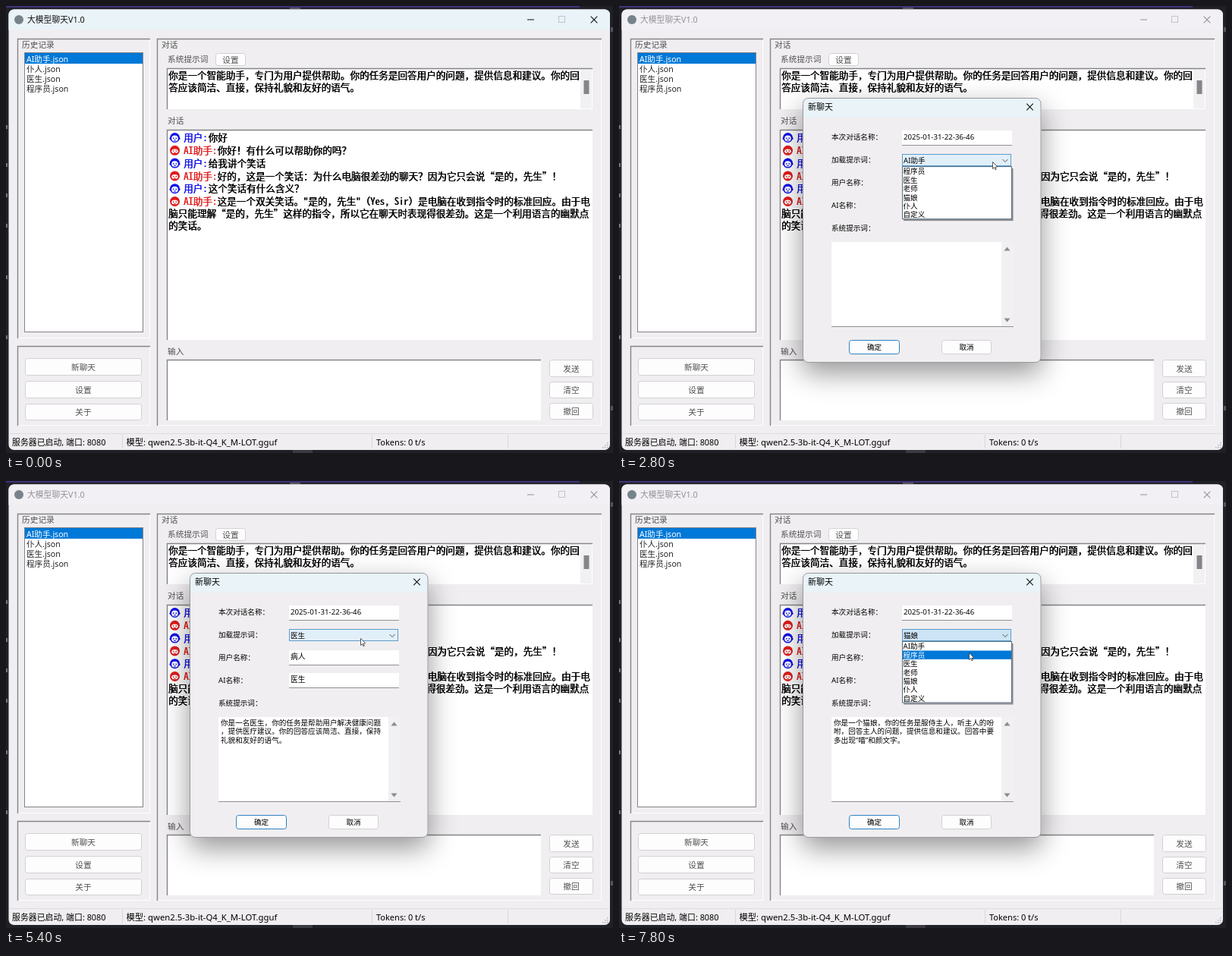
An HTML page with a canvas for the animation above (8 s loop, 800x589 px).

```html
<!DOCTYPE html>
<html lang="zh-CN">
<head>
<meta charset="utf-8">
<style>
html, body { margin: 0; width: 100%; height: 100%; overflow: hidden; background: #202027; }
canvas { display: block; width: 800px; height: 589px; }
</style>
</head>
<body>
<canvas id="stage" width="800" height="589"></canvas>
<script>
const ctx = document.getElementById('stage').getContext('2d');
const UI = '"Noto Sans", "Noto Sans CJK SC", sans-serif';
const MONO = '"Noto Sans Mono CJK SC", "Noto Sans CJK SC", monospace';
const LOOP = 8000, STEP = 200, ROW = 11.4;
const FACE = '#f0eef0', BLUE = '#0078d7', LABEL = '#505050';

const ROLES = ['AI助手', '程序员', '医生', '老师', '猫娘', '仆人', '自定义'];
const FORMS = [
  { at: 0, user: '', ai: '', lines: [] },
  { at: 3600, user: '用户', ai: '程序员',
    lines: ['你是一个程序员，你的任务是帮助用户解决问题，', '提供技术支持。你的回答应该简洁、直接，保持礼', '貌和友好的语气。'] },
  { at: 5200, user: '病人', ai: '医生',
    lines: ['你是一名医生，你的任务是帮助用户解决健康问题', '，提供医疗建议。你的回答应该简洁、直接，保持', '礼貌和友好的语气。'] },
  { at: 6600, user: '主人', ai: '猫娘',
    lines: ['你是一个猫娘，你的任务是服侍主人，听主人的吩', '咐，回答主人的问题，提供信息和建议。回答中要', '多出现“喵”和颜文字。'] }
];
const PICKS = [[0, 0], [3600, 1], [5200, 2], [6400, 4]];
const OPEN = [[2800, 3600], [4800, 5200], [5800, 6600], [7400, 8000]];
const CURSOR = [
  [400, 190, 540], [800, 140, 508], [1200, 126, 497], [1400, 119, 478], [1600, 116, 475],
  [2000, 240, 370], [2600, 485, 204], [2800, 492, 205], [3000, 488, 212], [3400, 452, 230],
  [3600, 450, 229], [4600, 480, 206], [4800, 476, 206], [5200, 462, 240], [5400, 467, 207],
  [5800, 466, 205], [6200, 455, 251], [6400, 452, 258], [6600, 453, 258],
  [7000, 462, 210], [7400, 464, 205], [7800, 461, 226]
];

const latest = (list, key, t) => list.filter(item => item[key] <= t).pop();
const within = (t, from, to) => t >= from && t < to;

function rect(x, y, w, h, color) {
  ctx.fillStyle = color;
  ctx.fillRect(x, y, w, h);
}

function rounded(x, y, w, h, r, fill, stroke) {
  ctx.beginPath();
  ctx.roundRect(x, y, w, h, r);
  if (fill) { ctx.fillStyle = fill; ctx.fill(); }
  if (stroke) { ctx.strokeStyle = stroke; ctx.lineWidth = 1; ctx.stroke(); }
}

function line(color, width, ...points) {
  ctx.beginPath();
  points.forEach(([x, y]) => ctx.lineTo(x, y));
  ctx.strokeStyle = color;
  ctx.lineWidth = width;
  ctx.stroke();
}

function disc(x, y, r, color) {
  ctx.fillStyle = color;
  ctx.beginPath();
  ctx.arc(x, y, r, 0, Math.PI * 2);
  ctx.fill();
}

// y is the vertical middle of the glyphs
function text(str, x, y, size, color = '#000', font = UI, align = 'left') {
  ctx.font = `${size}px ${font}`;
  ctx.textAlign = align;
  ctx.fillStyle = color;
  ctx.fillText(str, x, y + size * .38);
}

// Emboldened by overprinting, which stays thinner than a real bold face
function bold(str, x, y, color) {
  text(str, x - .1, y, 12.6, color, MONO);
  text(str, x + .5, y, 12.6, color, MONO);
}

function label(str, x, y) {
  text(str, x, y, 10.7, LABEL, MONO);
}

function sunken(x, y, w, h, fill) {
  if (fill) rect(x, y, w, h, fill);
  line('#fff', 1, [x + w - .5, y], [x + w - .5, y + h - .5], [x, y + h - .5]);
  line('#858488', 1.4, [x + w, y + .5], [x + .5, y + .5], [x + .5, y + h]);
}

function button(caption, x, y, w, h, { hover, border = '#d2d0d3', size = 10.7, color = LABEL } = {}) {
  rounded(x + .5, y + .5, w - 1, h - 1, 3, hover ? '#e2eff8' : '#fdfdfd', hover ? '#6f9fc2' : border);
  text(caption, x + w / 2, y + h / 2, size, color, MONO, 'center');
}

function cross(x, y, r, color) {
  line(color, 1.1, [x - r, y - r], [x + r, y + r]);
  line(color, 1.1, [x + r, y - r], [x - r, y + r]);
}

function triangle(x, y, h) {
  ctx.fillStyle = '#8b8a8d';
  ctx.beginPath();
  ctx.moveTo(x - 4, y + h / 2);
  ctx.lineTo(x + 4, y + h / 2);
  ctx.lineTo(x, y - h / 2);
  ctx.fill();
}

function avatar(y, isUser) {
  const x = 222.5, color = isUser ? '#1010e8' : '#e01c1c';
  disc(x, y, 6.5, color);
  if (isUser) {
    disc(x - 5.5, y + 1, 1.6, color);
    disc(x + 5.5, y + 1, 1.6, color);
  }
  ctx.fillStyle = '#fff';
  ctx.beginPath();
  ctx.ellipse(x, y + 1, 4.3, isUser ? 3.9 : 2.9, 0, 0, Math.PI * 2);
  ctx.fill();
  rect(x - 2.5, y, 1.5, 1.5, color);
  rect(x + 1, y, 1.5, 1.5, color);
  rect(x - 1.5, y + 2.7, 3, 1, color);
}

function drawDesktop() {
  rect(0, 0, 800, 589, '#202027');
  rect(0, 0, 756, 2, '#3f3278');
  rect(374, 2, 14, 2, '#55535f');
  rect(378, 585, 26, 4, '#3b3a42');
  [157, 207, 247, 287, 355, 434].forEach(y => rect(0, y, 2, 5, '#77757d'));
  [28, 527].forEach(y => rect(797, y, 3, 6, '#55535f'));
}

function drawFrame(active) {
  rounded(3.5, 4.5, 792.5, 580.5, 7, FACE);
  rounded(3.5, 4.5, 792.5, 27, [7, 7, 0, 0], active ? '#e9f3f8' : '#f2f0f4');
  const ink = active ? '#111' : '#949297';
  disc(17, 18, 6, '#77838b');
  text('大模型聊天V1.0', 28, 18, 10.8, ink);
  line(ink, 1, [687, 18], [696, 18]);
  ctx.strokeStyle = '#c3c4c8';
  ctx.strokeRect(728.5, 13.5, 8, 8);
  cross(775, 18, 4.3, ink);
}

function drawHistory(hover) {
  sunken(15, 43, 175, 395);
  label('历史记录', 21, 50.5);
  rect(24, 61, 157, 369, '#fff');
  ctx.strokeStyle = '#858488';
  ctx.lineWidth = 1;
  ctx.strokeRect(24.5, 61.5, 156, 368);
  rect(25, 62, 155, 14, BLUE);
  ['AI助手', '仆人', '医生', '程序员'].forEach((name, i) =>
    text(name + '.json', 27, 69.5 + i * 13.1, 10.6, i ? '#222' : '#fff'));

  sunken(15, 448, 175, 105);
  button('新聊天', 25, 464, 154, 23, { hover: hover === 'new' });
  button('设置', 25, 494, 154, 23, { hover: hover === 'settings' });
  button('关于', 25, 524, 154, 22);
}

function drawChat() {
  sunken(199, 43, 586, 510);
  label('对话', 205, 51);
  label('系统提示词', 213, 70);
  button('设置', 276, 62, 40, 17);

  sunken(212, 82, 561, 54, '#fff');
  rect(757, 84, 15, 51, '#f1f0f2');
  rect(761.5, 98, 7, 18, '#858488');
  bold('你是一个智能助手，专门为用户提供帮助。你的任务是回答用户的问题，提供信息和建议。你的回', 214, 91.5);
  bold('答应该简洁、直接，保持礼貌和友好的语气。', 214, 107.5);

  label('对话', 213, 150.5);
  sunken(212, 163, 561, 277, '#fff');
  [
    '你好',
    '你好！有什么可以帮助你的吗？',
    '给我讲个笑话',
    '好的，这是一个笑话：为什么电脑很差劲的聊天？因为它只会说“是的，先生”！',
    '这个笑话有什么含义？',
    '这是一个双关笑话。"是的，先生"（Yes, Sir）是电脑在收到指令时的标准回应。由于电'
  ].forEach((message, i) => {
    const isUser = i % 2 === 0, y = 173.5 + i * 16.8;
    avatar(y, isUser);
    bold(isUser ? '用户:' : 'AI助手:', 234, y, isUser ? '#1010e8' : '#e01c1c');
    bold(message, isUser ? 266.5 : 278.5, y);
  });
  bold('脑只能理解“是的，先生”这样的指令，所以它在聊天时表现得很差劲。这是一个利用语言的幽默点', 214, 273);
  bold('的笑话。', 214, 288.8);

  label('输入', 213, 454.5);
  sunken(212, 466, 493, 80, '#fff');
  button('发送', 716, 466, 58, 23);
  button('清空', 716, 495, 58, 22);
  button('撤回', 716, 523, 58, 22);
}

function drawStatus() {
  rect(4, 563, 791, 1, '#dedce0');
  [153, 482, 661].forEach(x => rect(x, 565, 1, 18, '#d8d6da'));
  text('服务器已启动, 端口: 8080', 8, 575, 10.9);
  text('模型: qwen2.5-3b-it-Q4_K_M-LOT.gguf', 158.5, 575, 11.3);
  text('Tokens: 0 t/s', 488, 575, 11);
  for (let i = 0; i < 3; i++)
    for (let j = 0; j <= i; j++) rect(792 - j * 3, 575 + i * 3, 1.5, 1.5, '#b5b3b8');
}

function field(value, y) {
  rect(373, y, 145, 19, '#fff');
  rect(373, y + 19, 145, 1, '#8f8e92');
  text(value, 375, y + 8.5, 9.7);
}

function drawDropdown(slide, selected) {
  const bottom = 292.5 - slide;
  rect(375, 214, 144.5, bottom - 212, '#8a898d');
  rect(373, 211, 145, bottom - 211, '#fff');
  ctx.save();
  ctx.beginPath();
  ctx.rect(373, 211, 145, bottom - 211);
  ctx.clip();
  ROLES.forEach((role, i) => {
    const y = 217.8 + i * ROW - slide;
    if (i === selected) rect(374, y - 5.7, 143, ROW, BLUE);
    text(role, 374.5, y, 9.6, i === selected ? '#fff' : '#000');
  });
  ctx.restore();
  ctx.strokeStyle = '#5b6f80';
  ctx.lineWidth = 1;
  ctx.strokeRect(373.5, 211.5, 144, bottom - 212);
}

function drawDialog(t, cursor) {
  ctx.save();
  ctx.shadowColor = 'rgba(0,0,0,.42)';
  ctx.shadowBlur = 36;
  ctx.shadowOffsetY = 14;
  rounded(242, 121, 314.5, 348.5, 7, FACE);
  ctx.restore();
  rounded(242, 121, 314.5, 26, [7, 7, 0, 0], '#e9f3f8');
  rounded(242.5, 121.5, 313.5, 348, 7, null, '#99989e');
  text('新聊天', 249, 133, 11);
  cross(541.5, 133, 4.3, '#111');
  ['本次对话名称：', '加载提示词：', '用户名称：', 'AI名称：', '系统提示词：'].forEach((caption, i) =>
    text(caption, 280, 172 + i * 30, 9.6));

  const form = latest(FORMS, 'at', t);
  field('2025-01-31-22-36-46', 164);
  field(form.user, 223);
  field(form.ai, 253);

  rect(280, 311, 224, 111, '#fff');
  rect(504, 311, 16, 111, '#f1f0f2');
  rect(280, 422, 240, 1, '#8f8e92');
  triangle(511.5, 320, 5);
  triangle(511.5, 414, -5);
  form.lines.forEach((row, i) => text(row, 283, 318 + i * 11.5, 9.6));
  button('确定', 303, 440, 67, 19, { border: '#2d82c4', size: 9.6, color: '#000' });
  button('取消', 425, 440, 66, 19, { size: 9.6, color: '#000' });

  const span = OPEN.find(([from, to]) => within(t, from, to));
  const pick = latest(PICKS, 0, t)[1];
  const over = cursor && cursor.x > 373 && cursor.x < 517 && within(cursor.y, 195, 212);
  const lit = span || over;
  rect(373, 195, 144, 16, span && t !== span[0] ? '#cce4f5' : lit ? '#e1eff9' : '#fff');
  ctx.strokeStyle = lit ? '#5b9dce' : '#cfcdd1';
  ctx.lineWidth = 1;
  ctx.strokeRect(373.5, 195.5, 143, 15);
  text(ROLES[pick], 375, 203.5, 9.6);
  line('#555', 1, [505.5, 202], [509, 205.5], [512.5, 202]);

  if (span) {
    const pointed = cursor && cursor.y > 212 ? Math.floor((cursor.y - 212) / ROW) : pick;
    drawDropdown(t === span[0] ? ROW : 0, pointed);
  }
}

function cursorAt(t) {
  if (t < 400 || within(t, 3800, 4600)) return null;
  const i = CURSOR.findLastIndex(key => key[0] <= t);
  const [t0, x0, y0] = CURSOR[i], [t1, x1, y1] = CURSOR[i + 1] || [LOOP, x0, y0];
  const p = (t - t0) / (t1 - t0);
  return { x: x0 + (x1 - x0) * p, y: y0 + (y1 - y0) * p };
}

function drawCursor({ x, y }) {
  ctx.beginPath();
  [[0, 0], [0, 9], [2, 7.2], [3.5, 10.3], [4.8, 9.7], [3.4, 6.7], [6.3, 6.4]].forEach(([dx, dy]) =>
    ctx.lineTo(x + dx + .5, y + dy + .5));
  ctx.closePath();
  ctx.fillStyle = '#fff';
  ctx.fill();
  ctx.strokeStyle = '#333';
  ctx.lineWidth = .8;
  ctx.stroke();
}

function draw(now) {
  const t = Math.floor(now % LOOP / STEP) * STEP;
  const cursor = cursorAt(t);
  const modal = t >= 1800;
  const hover = within(t, 800, 1600) ? 'settings' : t === 1600 ? 'new' : '';
  drawDesktop();
  drawFrame(!modal);
  drawHistory(hover);
  drawChat();
  drawStatus();
  if (modal) drawDialog(t, cursor);
  if (cursor) drawCursor(cursor);
}

const start = performance.now();
(function tick() {
  draw(performance.now() - start);
  requestAnimationFrame(tick);
})();
</script>
</body>
</html>
```
